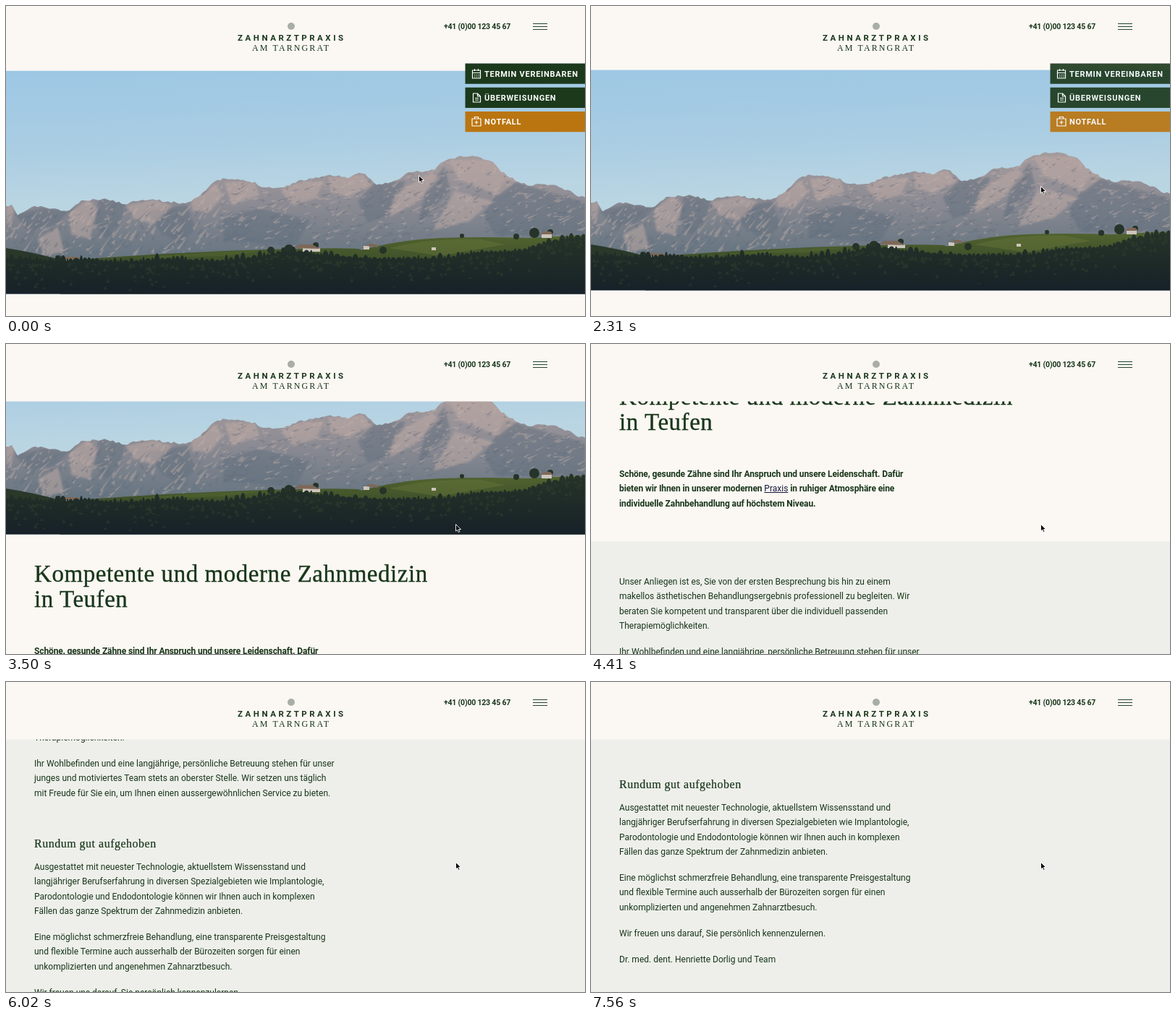
These frames come from a looping animation (800x429 px, 8 s). An HTML page:

```html
<!DOCTYPE html>
<html lang="de">
<head>
<meta charset="utf-8">
<title>Zahnarztpraxis</title>
<style>
  html, body { margin: 0; width: 100%; height: 100%; overflow: hidden; background: #fbf7f3; }
  #stage { position: relative; width: 800px; height: 429px; overflow: hidden; background: #fbf7f3; color: #18361a; }
  #page { position: absolute; left: 0; top: 0; width: 800px; height: 1400px; }
  #photo { position: absolute; left: 0; top: 89px; width: 800px; height: 310px; }
  #grey { position: absolute; left: 0; top: 653px; width: 800px; height: 747px; background: #eeefea; }
  #overlay { position: absolute; left: 0; top: 0; }
  h1, h2, p { position: absolute; left: 39px; margin: 0; white-space: nowrap; }
  h1, h2, .place { font-family: "Liberation Serif", serif; font-weight: 400; }
  h1 { font-size: 33px; line-height: 35px; letter-spacing: .55px; -webkit-text-stroke: .35px; }
  h2 { font-size: 16px; line-height: 20px; letter-spacing: .5px; -webkit-text-stroke: .2px; }
  p, #overlay { font-family: Roboto, sans-serif; }
  p { font-size: 12px; line-height: 20.45px; }
  .lead { font-weight: 700; letter-spacing: -.1px; }
  .lead u { font-weight: 400; color: #15193a; letter-spacing: 0; }
  .button { font-size: 11px; font-weight: 700; letter-spacing: .74px; fill: #fff; }
  .icon { fill: none; stroke: #fff; stroke-width: 1.2; }
</style>
</head>
<body>
<div id="stage">
  <div id="page">
    <svg id="photo" viewBox="0 89 800 310">
      <defs>
        <linearGradient id="sky" x2=".1" y2="1">
          <stop stop-color="#9cc7e4"/><stop offset=".35" stop-color="#aacde3"/><stop offset=".6" stop-color="#bad5e2"/>
        </linearGradient>
        <linearGradient id="rock" gradientUnits="userSpaceOnUse" x1="0" y1="215" x2="0" y2="345">
          <stop stop-color="#a39a9d"/><stop offset=".45" stop-color="#8c8b93"/><stop offset="1" stop-color="#687682"/>
        </linearGradient>
        <linearGradient id="meadow" x2="0" y2="1">
          <stop stop-color="#52642f"/><stop offset=".5" stop-color="#3b4d29"/><stop offset="1" stop-color="#263624"/>
        </linearGradient>
        <linearGradient id="wood" x2="0" y2="1">
          <stop stop-color="#27342a"/><stop offset=".55" stop-color="#1d2a27"/><stop offset="1" stop-color="#172129"/>
        </linearGradient>
        <clipPath id="massif"><path class="ridge"/></clipPath>
        <filter id="soft"><feGaussianBlur stdDeviation="1.5"/></filter>
      </defs>
      <rect y="89.5" width="800" height="309" fill="url(#sky)"/>
      <path class="ridge" fill="url(#rock)"/>
      <g clip-path="url(#massif)">
        <g filter="url(#soft)">
          <path fill="#606e7f" opacity=".5" d="M12 288L50 280 88 284 70 302 30 310zM128 266L166 272 158 300 136 322 122 300zM196 284L250 275 262 308 240 330 212 312zM300 292L350 280 420 296 400 332 300 326zM508 246L552 242 532 288 500 300 486 270zM690 240L800 272V318H676L660 288zM580 255L606 222 614 256 570 300z"/>
          <path fill="#bda9a4" opacity=".55" d="M0 276L12 274 8 298 0 302zM88 286L112 268 126 280 116 322 90 316zM44 322L72 306 80 340 52 346zM166 276L204 268 230 276 204 302 176 294zM256 266L290 246 300 262 282 284 258 284zM302 244L344 244 350 262 312 276zM378 254L402 245 440 242 428 266 396 276zM446 238L492 233 506 248 474 264 448 258zM536 262L586 230 600 238 566 272 530 292zM612 214L668 213 706 242 680 262 626 240zM620 256L672 270 640 298 590 310z"/>
        </g>
        <path id="shade" fill="#5e6b7c" opacity=".35"/>
        <path id="light" fill="#c3b0a9" opacity=".4"/>
      </g>
      <path d="M0 335Q40 341 78 352L110 372H0z" fill="#2a382a"/>
      <path d="M75 353Q220 341 360 337T490 338Q545 323 600 321T720 321L800 317V398.500H75z" fill="url(#meadow)"/>
      <path d="M530 335Q585 321 655 323L690 330 600 346z" fill="#64753a" opacity=".5"/>
      <path d="M180 349Q280 339 355 339L300 346z" fill="#5f7036" opacity=".3"/>
      <g fill="#263329">
        <circle cx="72" cy="349" r="4"/><circle cx="366" cy="338" r="5"/><circle cx="391" cy="337" r="7"/>
        <circle cx="428" cy="331" r="4"/><circle cx="521" cy="338" r="5"/><circle cx="630" cy="318" r="3"/>
        <circle cx="705" cy="319" r="4"/><circle cx="730" cy="314" r="7"/><circle cx="752" cy="313" r="4"/>
      </g>
      <g fill="#cdc5bb">
        <path d="M78 351h24v4H78zM410 335h24v5h-24zM494 332h8v5h-8zM588 334h6v4h-6zM740 316h14v5h-14z"/>
        <path d="M76 351l6-4h17l5 4zM398 335l8-5h17l11 6zM497 332l5-3h9l3 5zM738 316l5-4h9l4 4z" fill="#7e6858"/>
      </g>
      <path id="trees" fill="url(#wood)"/>
      <path id="crowns" fill="#33422f" opacity=".45"/>
    </svg>
    <div id="grey"></div>
    <h1 style="top:436px">Kompetente und moderne Zahnmedizin<br>in Teufen</h1>
    <p class="lead" style="top:550px">Schöne, gesunde Zähne sind Ihr Anspruch und unsere Leidenschaft. Dafür<br>bieten wir Ihnen in unserer modernen <u>Praxis</u> in ruhiger Atmosphäre eine<br>individuelle Zahnbehandlung auf höchstem Niveau.</p>
    <p style="top:699px">Unser Anliegen ist es, Sie von der ersten Besprechung bis hin zu einem<br>makellos ästhetischen Behandlungsergebnis professionell zu begleiten. Wir<br>beraten Sie kompetent und transparent über die individuell passenden<br>Therapiemöglichkeiten.</p>
    <p style="top:796px">Ihr Wohlbefinden und eine langjährige, persönliche Betreuung stehen für unser<br>junges und motiviertes Team stets an oberster Stelle. Wir setzen uns täglich<br>mit Freude für Sie ein, um Ihnen einen aussergewöhnlichen Service zu bieten.</p>
    <h2 style="top:907px">Rundum gut aufgehoben</h2>
    <p style="top:939px">Ausgestattet mit neuester Technologie, aktuellstem Wissensstand und<br>langjähriger Berufserfahrung in diversen Spezialgebieten wie Implantologie,<br>Parodontologie und Endodontologie können wir Ihnen auch in komplexen<br>Fällen das ganze Spektrum der Zahnmedizin anbieten.</p>
    <p style="top:1036px">Eine möglichst schmerzfreie Behandlung, eine transparente Preisgestaltung<br>und flexible Termine auch ausserhalb der Bürozeiten sorgen für einen<br>unkomplizierten und angenehmen Zahnarztbesuch.</p>
    <p style="top:1113px">Wir freuen uns darauf, Sie persönlich kennenzulernen.</p>
    <p style="top:1149px">Dr. med. dent. Henriette Dorlig und Team</p>
  </div>

  <svg id="overlay" width="800" height="429">
    <rect id="header" width="800" height="89.5" fill="#fbf7f3"/>
    <g fill="#18361a">
      <circle cx="394" cy="28" r="5" fill="#a9aea5"/>
      <text x="320" y="48" font-size="11.5" font-weight="700" letter-spacing="3.5">ZAHNARZTPRAXIS</text>
      <text class="place" x="340" y="62" font-size="12" letter-spacing="2.1">AM TARNGRAT</text>
      <text x="605" y="31.5" font-size="10.5" font-weight="700" letter-spacing="-.2">+41 (0)00 123 45 67</text>
      <path d="M728 24.5h20M728 28.5h20M728 32.5h20" stroke="#24452a" stroke-width="1.2"/>
    </g>
    <g id="buttons">
      <path d="M634.5 79.500H800v28.200H634.500zM634.500 112.700H800v28.200H634.500z" fill="#1c391c"/>
      <path d="M634.500 146H800v28.200H634.500z" fill="#ba7510"/>
      <g class="button">
        <text x="661" y="97.7">TERMIN VEREINBAREN</text>
        <text x="661" y="131">ÜBERWEISUNGEN</text>
        <text x="661" y="164.3">NOTFALL</text>
      </g>
      <g class="icon">
        <path d="M644.5 89h11v11h-11zM644.5 92.5h11M647.5 87v3M652.5 87v3"/>
        <path d="M647 95.5h7M647 98h7" stroke-dasharray="1.4 1.4"/>
        <path d="M645.5 121h6l4 4v8h-10zM651.5 121v4h4M648 127.5h5M648 130h5"/>
        <path d="M644 156h12v10h-12zM647.5 156v-2.5h5v2.5M650 158.5v5M647.5 161h5"/>
      </g>
    </g>
    <path id="cursor" d="M0 0V9.5L2.2 7.6 3.8 11 5.4 10.2 3.9 7H7z" stroke="#fff" stroke-width=".9"/>
  </svg>
</div>
<script>
  const $ = id => document.getElementById(id);

  // Monotone cubic curve through a few [x, y] points
  function curve(points) {
    const slope = i => (points[i + 1][1] - points[i][1]) / (points[i + 1][0] - points[i][0]);
    const tangent = i => {
      if (i === 0 || i === points.length - 1) return 0;
      const a = slope(i - 1), b = slope(i);
      return a * b > 0 ? 2 * a * b / (a + b) : 0;
    };
    return x => {
      if (x <= points[0][0]) return points[0][1];
      const i = points.findIndex(p => p[0] > x) - 1;
      if (i < 0) return points[points.length - 1][1];
      const [x0, y0] = points[i], [x1, y1] = points[i + 1], w = x1 - x0, u = (x - x0) / w;
      return y0 + (y1 - y0) * u * u * (3 - 2 * u)
        + w * u * (1 - u) * (tangent(i) * (1 - u) - tangent(i + 1) * u);
    };
  }

  let seed = 11;
  const rand = () => (seed = seed * 16807 % 2147483647) / 2147483647;
  const f = n => n.toFixed(1);

  const skyline = curve([[0, 278], [9, 275], [14, 288], [42, 277], [85, 283], [104, 270], [140, 267],
    [163, 273], [190, 267], [246, 272], [270, 259], [286, 245], [300, 239], [340, 243], [358, 250],
    [380, 251], [400, 243], [456, 234], [472, 237], [492, 231], [514, 246], [540, 241], [556, 230],
    [588, 227], [606, 214], [636, 207], [670, 214], [686, 230], [724, 247], [748, 246], [770, 252], [800, 264]]);
  const treeline = curve([[0, 350], [60, 353], [100, 350], [150, 354], [225, 350], [280, 353], [350, 346],
    [382, 339], [440, 345], [530, 350], [600, 349], [645, 341], [700, 339], [745, 326], [800, 319]]);

  function drawPhoto() {
    let ridge = "M0 360";
    for (let x = 0; x <= 800; x += 4) ridge += `L${x} ${f(skyline(x) + rand() * 3 - 1)}`;
    document.querySelectorAll(".ridge").forEach(p => p.setAttribute("d", ridge + "V360z"));

    // Short tilted facets stand for the rock strata
    let light = "", shade = "";
    for (let i = 0; i < 1300; i++) {
      const x = rand() * 815, depth = rand(), y = skyline(x) + depth * 95;
      const length = 3 + rand() * rand() * 18, tilt = x < 300 ? .3 + rand() : rand() * .7 - .1;
      const facet = `M${f(x)} ${f(y)}l${f(-length)} ${f(length * tilt)} ${f(1 + rand() * 4)} ${f(1 + rand() * 2)}z`;
      if (rand() > .3 + depth * .45) light += facet; else shade += facet;
    }
    $("light").setAttribute("d", light);
    $("shade").setAttribute("d", shade);

    let trees = "M0 398.5V350", crowns = "";
    for (let x = 0; x < 806;) {
      const w = 3 + rand() * 7, y = treeline(x), top = y - 1 - rand() * rand() * 9;
      trees += `Q${f(x + w * .2)} ${f(top)} ${f(x + w / 2)} ${f(top)}T${f(x + w)} ${f(y + 1)}`;
      x += w;
    }
    for (let i = 0; i < 260; i++) {
      const x = rand() * 800, y = treeline(x) + 3 + rand() * rand() * 38, h = 2 + rand() * 5;
      crowns += `M${f(x)} ${f(y)}l3 ${f(h)}h-6z`;
    }
    $("trees").setAttribute("d", trees + "V398.5z");
    $("crowns").setAttribute("d", crowns);
  }

  const scrollAt = curve([[2100, 0], [2310, 5], [3500, 135], [4410, 380], [4800, 530], [5040, 564],
    [5320, 571], [5530, 573], [5610, 573], [5980, 685], [6370, 745], [6480, 746], [6720, 751],
    [7250, 773], [7560, 775]]);
  const pointerAt = curve([[0, 0], [1610, 1]]);
  const LOOP = 8000, TICK = 70, start = performance.now();

  function render() {
    const elapsed = (performance.now() - start) % LOOP;
    const time = Math.floor(elapsed / TICK) * TICK;
    const scroll = Math.round(scrollAt(time)), shrink = Math.min(1, scroll / 55), move = pointerAt(time);
    $("page").style.transform = `translateY(${-scroll}px)`;
    $("header").setAttribute("height", 89.5 - 10 * shrink);
    $("buttons").setAttribute("opacity", 1 - shrink);
    $("cursor").setAttribute("transform", `translate(${570.5 + 51 * move} ${234.5 + 15 * move})`);
    requestAnimationFrame(render);
  }

  drawPhoto();
  render();
</script>
</body>
</html>
```
